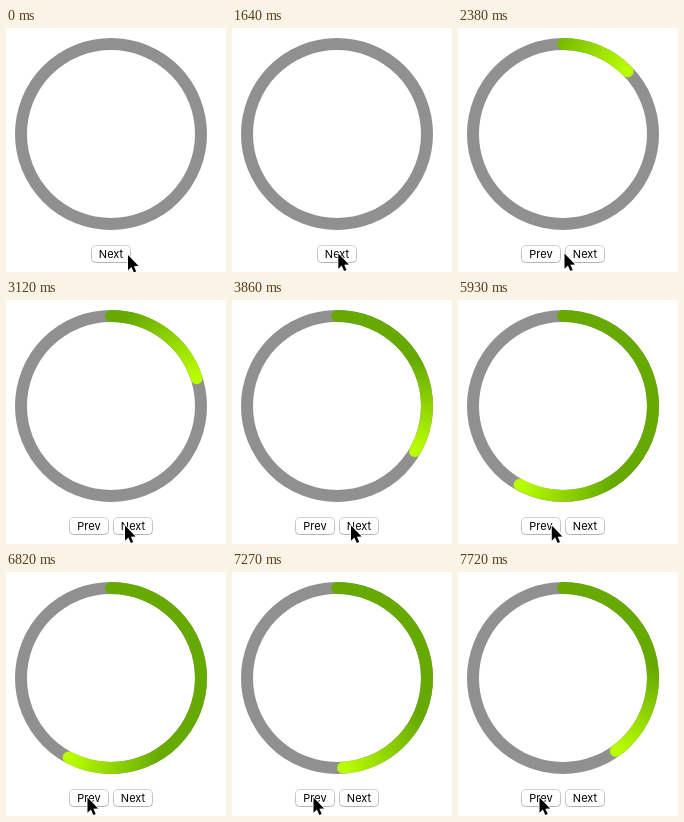
An HTML page with a canvas that plays this animation: 220x244 px, repeating every 8 s.

```html
<!DOCTYPE html>
<html lang="en">
<head>
<meta charset="utf-8">
<title>Step ring</title>
<style>
  html, body { margin: 0; width: 100%; height: 100%; overflow: hidden; background: #fff; }
  canvas { display: block; width: 220px; height: 244px; }
</style>
</head>
<body>
<canvas id="stage"></canvas>
<script>
const WIDTH = 220, HEIGHT = 244, LOOP = 8000;
const TICK = LOOP / 54, TICK_LEAD = 12;
const RING = { x: 105, y: 106, radius: 90, width: 12 };
const STEP_ANGLE = 72, STEP_TIME = 1000, GLOW = 92;

// Each click moves the ring one step forward or back at constant speed.
const clicks = [
  { at: 1733, dir: 1 },
  { at: 3185, dir: 1 },
  { at: 5025, dir: 1 },
  { at: 6705, dir: -1 }
];

// Pointer tip: time, x, y.
const pointerPath = [
  [0, 122, 227], [148, 111, 226], [296, 106, 225.5], [2371, 106.5, 225.5],
  [2667, 119, 225.5], [5630, 119, 225.5], [6070, 81.5, 225.5], [LOOP, 81.5, 225.5]
];

const canvas = document.getElementById("stage");
const ctx = canvas.getContext("2d");
const scale = window.devicePixelRatio || 1;
canvas.width = WIDTH * scale;
canvas.height = HEIGHT * scale;
ctx.scale(scale, scale);

const clamp = v => Math.max(0, Math.min(1, v));

function angleAt(t) {
  const steps = clicks.reduce((sum, c) => sum + c.dir * clamp((t - c.at) / STEP_TIME), 0);
  return steps * STEP_ANGLE * Math.PI / 180;
}

function pointerAt(t) {
  const next = Math.max(1, pointerPath.findIndex(p => p[0] >= t));
  const [t0, x0, y0] = pointerPath[next - 1];
  const [t1, x1, y1] = pointerPath[next];
  const k = clamp((t - t0) / (t1 - t0));
  return [x0 + (x1 - x0) * k, y0 + (y1 - y0) * k];
}

function strokeArc(angle, style) {
  const start = -Math.PI / 2;
  ctx.beginPath();
  ctx.arc(RING.x, RING.y, RING.radius, start, start + angle);
  ctx.lineWidth = RING.width;
  ctx.strokeStyle = style;
  ctx.stroke();
}

function drawRing(angle) {
  ctx.lineCap = "butt";
  strokeArc(Math.PI * 2, "#909090");
  if (angle <= 0) return;
  // The bright color fades out with distance from the moving end.
  const x = RING.x + RING.radius * Math.sin(angle);
  const y = RING.y - RING.radius * Math.cos(angle);
  const glow = ctx.createRadialGradient(x, y, 0, x, y, GLOW);
  glow.addColorStop(0, "#bbff00");
  glow.addColorStop(1, "#66aa00");
  ctx.lineCap = "round";
  strokeArc(angle, glow);
}

function drawButton(label, x) {
  const y = 217, w = 40, h = 18;
  const edge = ctx.createLinearGradient(0, y, 0, y + h);
  edge.addColorStop(0, "#d2d2d2");
  edge.addColorStop(1, "#b4b4b4");
  ctx.beginPath();
  ctx.roundRect(x + 0.5, y + 0.5, w - 1, h - 1, 4);
  ctx.fillStyle = "#fff";
  ctx.fill();
  ctx.lineWidth = 1;
  ctx.strokeStyle = edge;
  ctx.stroke();
  ctx.fillStyle = "#000";
  ctx.font = "11px Inter, sans-serif";
  ctx.textAlign = "center";
  ctx.fillText(label, x + w / 2, 230);
}

function drawPointer([x, y]) {
  const outline = [[0, 0], [0, 15.2], [3.4, 12], [5.8, 17.4], [8.2, 16.4], [5.9, 11.2], [10.6, 11]];
  ctx.beginPath();
  outline.forEach(([dx, dy]) => ctx.lineTo(x + dx, y + dy));
  ctx.closePath();
  ctx.lineJoin = "round";
  ctx.lineWidth = 1.6;
  ctx.strokeStyle = "#fff";
  ctx.stroke();
  ctx.fillStyle = "#000";
  ctx.fill();
}

function draw(now) {
  const elapsed = now % LOOP;
  const t = Math.min(53, Math.floor((elapsed + TICK_LEAD) / TICK)) * TICK;
  ctx.fillStyle = "#fff";
  ctx.fillRect(0, 0, WIDTH, HEIGHT);
  drawRing(angleAt(t));
  if (t < clicks[0].at) {
    drawButton("Next", 85);
  } else {
    drawButton("Prev", 63);
    drawButton("Next", 107);
  }
  drawPointer(pointerAt(t));
}

const origin = performance.now();
function frame() {
  draw(performance.now() - origin);
  requestAnimationFrame(frame);
}
frame();
</script>
</body>
</html>
```
